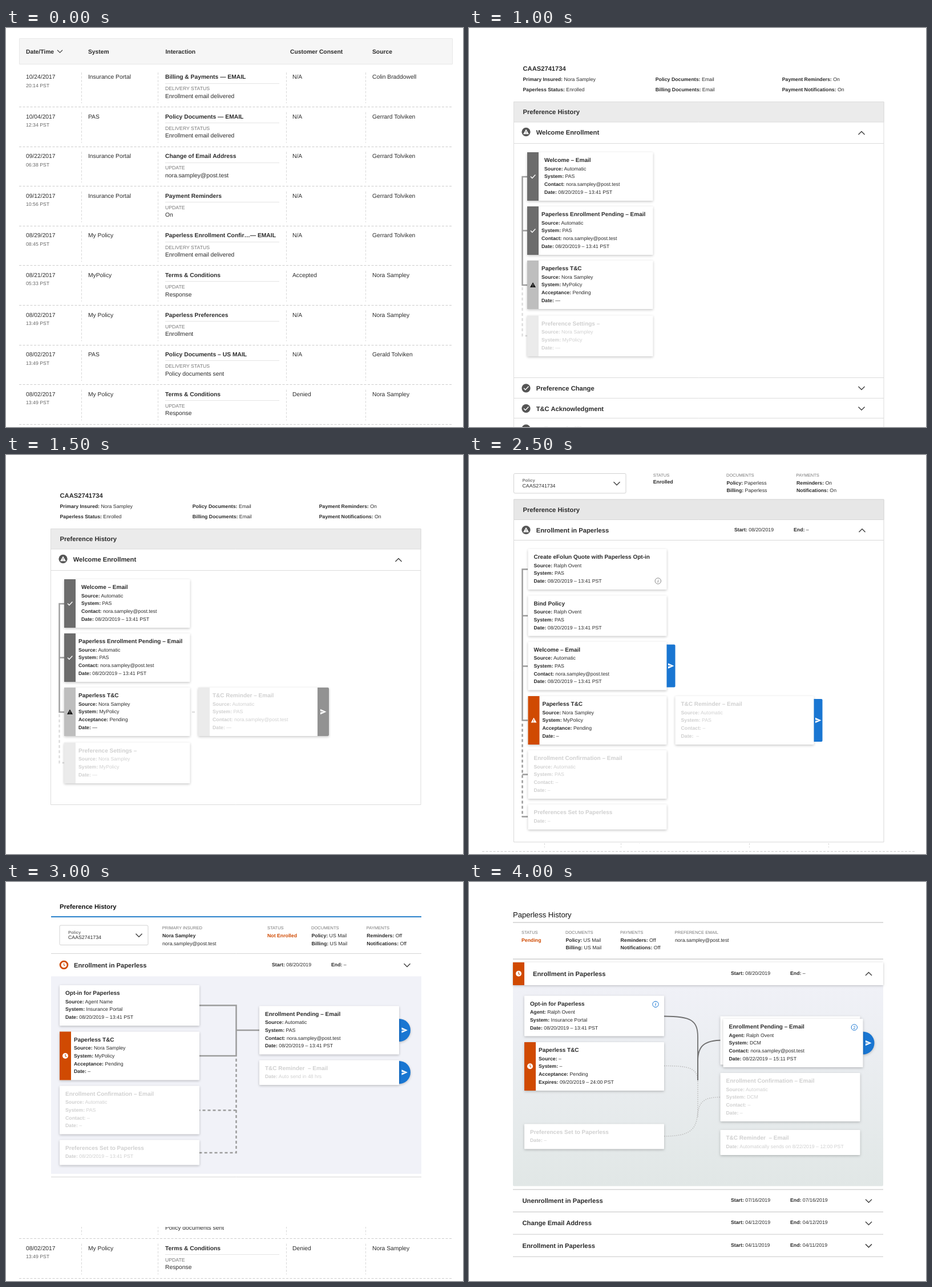
An HTML page with a canvas that plays this animation: 801 by 700 pixels, repeating every 4500 ms.

```html
<!DOCTYPE html>
<html lang="en">
<head>
<meta charset="utf-8">
<title>Preference history</title>
<style>
html, body { margin: 0; width: 100%; height: 100%; overflow: hidden; background: #fff; }
canvas { display: block; }
</style>
</head>
<body>
<canvas id="stage" width="801" height="700"></canvas>
<script>
const ctx = document.getElementById('stage').getContext('2d');
const HOLD = 500;
const INK = '#2b2b2b', FADE = '#d0d0d0', LABEL = '#777', DARK = '#555', WIRE = '#9c9c9c';
const ORANGE = '#d04a02', BLUE = '#1976d2';
const CLIENT = 'Nora Sampley', MAIL = 'nora.sampley@post.test', AGENT = 'Ralph Ovent';
const WHEN = 'Date: 08/20/2019 – 13:41 PST', POLICY = 'CAAS2741734';

// y is the middle of the capitals
function say(s, x, y, size = 8.75, weight = 400, col = INK) {
  ctx.font = `${weight} ${size}px "Liberation Sans", Helvetica, Arial, sans-serif`;
  ctx.fillStyle = col;
  ctx.fillText(s, x, y + size * 0.36 - 0.5);
  return x + ctx.measureText(s).width;
}
const bold = (s, x, y, size = 11.2, col = INK) => say(s, x, y, size, 700, col);
const label = (s, x, y) => say(s, x, y, 7.55, 400, LABEL);

// Bold key up to the colon, plain value after it
function pair(s, x, y, col = INK) {
  const cut = s.indexOf(':') + 1;
  say(s.slice(cut), bold(s.slice(0, cut), x, y, 8.75, col), y, 8.75, 400, col);
}

function lines(title, list, x, y, col = INK) {
  bold(title, x, y, 10, col);
  list.forEach((s, i) => pair(s, x, y + 15 + 13.75 * i, col));
}

function box(x, y, w, h, fill, edge, r = 0) {
  ctx.beginPath();
  ctx.roundRect(x, y, w, h, r);
  if (fill) { ctx.fillStyle = fill; ctx.fill(); }
  if (edge) { ctx.strokeStyle = edge; ctx.lineWidth = 1; ctx.stroke(); }
}

function stroke(d, col, width = 1, dash = []) {
  ctx.strokeStyle = col;
  ctx.lineWidth = width;
  ctx.setLineDash(dash);
  ctx.stroke(new Path2D(d));
  ctx.setLineDash([]);
}
const rule = (x1, x2, y, col, width = 1, dash) => stroke(`M${x1} ${y}H${x2}`, col, width, dash);

function disc(x, y, r, fill, edge) {
  ctx.beginPath();
  ctx.arc(x, y, r, 0, 7);
  if (fill) { ctx.fillStyle = fill; ctx.fill(); }
  if (edge) { ctx.strokeStyle = edge; ctx.lineWidth = 1; ctx.stroke(); }
}

function chevron(x, y, up, w = 5.5) {
  const h = (up ? -1 : 1) * w * 0.5;
  stroke(`M${x - w} ${y - h}L${x} ${y + h}L${x + w} ${y - h}`, '#444', w > 5 ? 1.5 : 1.1);
}

function tick(x, y) {
  stroke(`M${x - 4} ${y}l2.8 3l5.6 -6`, '#fff', 1.4);
}

function warn(x, y, col = '#fff', mark = DARK) {
  ctx.fillStyle = col;
  ctx.fill(new Path2D(`M${x} ${y - 4.8}l5 8.8h-10z`));
  stroke(`M${x} ${y - 1.5}v2.7m0 .9v1.1`, mark, 1);
}

function clock(x, y) {
  disc(x, y, 5, '#fff');
  stroke(`M${x} ${y - 3}v3.2l2 1.6`, ORANGE, 1.1);
}

function plane(x, y) {
  ctx.fillStyle = '#fff';
  ctx.fill(new Path2D(`M${x - 5} ${y - 4.7}l10.5 4.7l-10.5 4.7v-3.6l6.5 -1.1l-6.5 -1.1z`));
}

function badge(x, y, kind) {
  if (kind === 'open') return disc(x, y, 7.2, null, '#888');
  disc(x, y, 7.6, DARK);
  (kind === 'warn' ? warn : tick)(x, y);
}

function note(s, x, y, col) {
  disc(x, y, 5.2, '#fff', col);
  ctx.textAlign = 'center';
  say(s, x, y + 0.5, 7.5, s === 'i' ? 'italic 700' : 400, col);
  ctx.textAlign = 'left';
}

function lift(draw) {
  ctx.shadowColor = 'rgba(0,0,0,.23)';
  ctx.shadowBlur = 4;
  ctx.shadowOffsetY = 1.4;
  draw();
  ctx.shadowColor = 'transparent';
}

// pad: text inset; tab: colour of the left strip
function card(x, y, w, h, title, list, { pad = 10, tab, faded } = {}) {
  lift(() => box(x, y, w, h, '#fff', null, 1));
  if (tab) box(x, y, 20, h, tab);
  lines(title, list, x + pad, y + 14, faded ? FADE : INK);
}

function sendDot(x, y) {
  lift(() => {
    ctx.beginPath();
    ctx.arc(x, y, 20, -Math.PI / 2, Math.PI / 2);
    ctx.fillStyle = BLUE;
    ctx.fill();
  });
  plane(x + 9.5, y);
}

function sendTab(x, y, w, h, fill = '#929292') {
  box(x, y, w, h, fill, null, [0, 2, 2, 0]);
  plane(x + w / 2, y + h / 2);
}

function picker(x, y, w) {
  box(x, y, w, 34.5, '#fff', '#d2d2d2', 2);
  bold('Policy', x + 15, y + 12.3, 7.5, LABEL);
  say(POLICY, x + 15, y + 21.7);
  chevron(x + w - 16, y + 17.5, false);
}

function facts(x, y, head, list) {
  label(head, x, y);
  list.forEach((s, i) => pair(s, x + 0.5, y + 13.5 * (i + 1)));
}

function span(x, y, start, end) {
  pair('Start: ' + start, x, y);
  pair('End: ' + end, x + 104, y);
}

const mailed = ['DELIVERY STATUS', 'Enrollment email delivered'];
const LOG = [
  ['10/24/2017', '20:14', 'Insurance Portal', 'Billing & Payments — EMAIL', ...mailed, 'N/A', 'Colin Braddowell'],
  ['10/04/2017', '12:34', 'PAS', 'Policy Documents — EMAIL', ...mailed, 'N/A', 'Gerrard Tolviken'],
  ['09/22/2017', '06:38', 'Insurance Portal', 'Change of Email Address', 'UPDATE', MAIL, 'N/A', 'Gerrard Tolviken'],
  ['09/12/2017', '10:56', 'Insurance Portal', 'Payment Reminders', 'UPDATE', 'On', 'N/A', 'Gerrard Tolviken'],
  ['08/29/2017', '08:45', 'My Policy', 'Paperless Enrollment Confir…— EMAIL', ...mailed, 'N/A', 'Gerrard Tolviken'],
  ['08/21/2017', '05:33', 'MyPolicy', 'Terms & Conditions', 'UPDATE', 'Response', 'Accepted', CLIENT],
  ['08/02/2017', '13:49', 'My Policy', 'Paperless Preferences', 'UPDATE', 'Enrollment', 'N/A', CLIENT],
  ['08/02/2017', '13:49', 'PAS', 'Policy Documents – US MAIL', 'DELIVERY STATUS', 'Policy documents sent', 'N/A', 'Gerald Tolviken'],
  ['08/02/2017', '13:49', 'My Policy', 'Terms & Conditions', 'UPDATE', 'Response', 'Denied', CLIENT]
];

function log(top = 0) {
  ctx.save();
  ctx.beginPath();
  ctx.rect(0, top, 801, 700 - top);
  ctx.clip();
  box(23.5, 18.5, 759, 45, '#f6f6f6', '#e8e8e8');
  [['Date/Time', 35], ['System', 144], ['Interaction', 279.5], ['Customer Consent', 498], ['Source', 642]]
    .forEach(([s, x]) => bold(s, x, 41.3, 10.3));
  chevron(94.5, 41, false, 4.5);
  LOG.forEach(([date, time, system, title, kind, value, consent, source], i) => {
    const y = 86 + 69.57 * i;
    say(date, 35, y, 10.3);
    say(time + ' PST', 35, y + 15, 8.7, 400, '#666');
    say(system, 144, y, 10.3);
    bold(title, 279, y, 10.3);
    rule(279, 479, Math.round(y + 10.5) + 0.5, '#e4e4e4');
    say(kind, 279, y + 20.7, 8.7, 400, LABEL);
    say(value, 279, y + 33.5, 10.3);
    say(consent, 502, y, 10.3);
    say(source, 642, y, 10.3);
    for (const x of [132.5, 266.5, 491.5, 630.5]) stroke(`M${x} ${y - 8}V${y + 46}`, '#d8d8d8', 1, [4, 2.5]);
    rule(23, 783, Math.floor(y + 52.6) + 0.5, '#cdcdcd', 1, [4, 2.5]);
  });
  ctx.restore();
}

function summary(y) {
  bold(POLICY, 94.5, y);
  [['Primary Insured: ' + CLIENT, 'Paperless Status: Enrolled'],
   ['Policy Documents: Email', 'Billing Documents: Email'],
   ['Payment Reminders: On', 'Payment Notifications: On']]
    .forEach((col, i) => col.forEach((s, j) => pair(s, [94.5, 326.7, 548.7][i], y + 18.7 + 18.3 * j)));
}

function panel(top, bottom, edge, fill) {
  box(78.5, top, 648.5, bottom - top, '#fff', edge);
  box(78.5, top, 648.5, 35.5, fill, edge);
  bold('Preference History', 94.5, top + 18);
}

function welcome(edge) {
  badge(100, 182.3, 'warn');
  bold('Welcome Enrollment', 117.7, 183);
  chevron(688, 184.3, true);
  rule(78.5, 727, 202.5, edge);
}

function rows(top, edge) {
  ['Preference Change', 'T&C Acknowledgment', 'Policy and Billing Documents', 'Preference Change'].forEach((s, i) => {
    const y = top + 35.7 * i;
    rule(78.5, 727, Math.floor(y) + 0.5, edge);
    badge(100, y + 18.3, 'tick');
    bold(s, 117.7, y + 19.3);
    chevron(688, y + 18.3, false);
  });
}

function checklist() {
  const edge = '#858585';
  summary(72);
  panel(130.5, 580.5, edge, '#e7e7e7');
  welcome(edge);
  const list = ['Source: Agent', 'System: PAS', 'Contact: ' + MAIL, WHEN];
  stroke('M100 236V292M100 317V373M100 398V404', '#999', 1.4);
  badge(100, 223.5, 'tick');
  lines('Welcome – Email', list, 117.7, 224);
  badge(100, 304.5, 'tick');
  lines('Paperless Enrollment Pending – Email', list, 117.7, 305.4);
  badge(100, 385.7, 'warn');
  bold('Paperless Terms and Conditions Acceptance', 117.7, 386.8, 10);
  badge(100, 416.5, 'open');
  bold('Communication Preferences Set', 117.7, 417.5, 10, '#c8c8c8');
  rows(438, edge);
}

function tabCards(full) {
  const edge = '#dcdcdc', pale = '#ebebeb', grey = '#6c6c6c';
  summary(71.5);
  panel(129.5, full ? 613.5 : 760, edge, pale);
  welcome(edge);
  const auto = ['Source: Automatic', 'System: PAS', 'Contact: ' + MAIL];
  stroke('M102 261H93.5V451H102M93.5 355.5H102', '#a0a0a0', 2.5);
  stroke('M93.5 455V540H102', '#dedede', 2.5, [5, 4]);
  card(102, 218, 220.5, 85, 'Welcome – Email', [...auto, WHEN], { pad: 30, tab: grey });
  tick(112, 260.5);
  card(102, 313, 220.5, 85, 'Paperless Enrollment Pending – Email', [...auto, WHEN], { pad: 25, tab: grey });
  tick(112, 355.5);
  card(102, 408, 220.5, 85, 'Paperless T&C',
    ['Source: ' + CLIENT, 'System: MyPolicy', 'Acceptance: Pending', 'Date: —'], { pad: 25, tab: '#bebebe' });
  warn(112, 451, '#111', '#bebebe');
  card(102, 504.5, 220.5, 71.5, 'Preference Settings –',
    ['Source: ' + CLIENT, 'System: MyPolicy', 'Date: —'], { pad: 25, tab: pale, faded: true });
  if (!full) return rows(613.5, edge);
  rule(326, 331, 451, '#dedede', 2.5);
  card(337, 408, 229, 85, 'T&C Reminder – Email', [...auto, 'Date: —'], { pad: 25, tab: pale, faded: true });
  sendTab(546, 408, 20, 85);
}

function column(tab, send) {
  const edge = '#d8d8d8', pas = 'System: PAS', by = 'Source: ' + AGENT, auto = 'Source: Automatic';
  picker(78.5, 32, 196.5);
  label('STATUS', 322.7, 35);
  bold('Enrolled', 322.7, 47, 8.75);
  facts(451, 35, 'DOCUMENTS', ['Policy: Paperless', 'Billing: Paperless']);
  facts(573.5, 35, 'PAYMENTS', ['Reminders: On', 'Notifications: On']);
  panel(77.5, 678.5, edge, '#e7e7e7');
  badge(100, 131, 'warn');
  bold('Enrollment in Paperless', 117.7, 132);
  span(465, 130.5, '08/20/2019', '–');
  chevron(689, 132, true);
  rule(78.5, 727, 149, edge);
  stroke('M103 200H93.5V465H103M93.5 281.5H103M93.5 370H103', WIRE, 2.5);
  stroke('M93.5 471V634', WIRE, 2.5, [5, 4]);
  stroke('M93.5 560H103M92.5 634H103', WIRE, 2.5);
  card(103.5, 164.5, 243, 71, 'Create eFolun Quote with Paperless Opt-in', [by, pas, WHEN]);
  note('i', 331.3, 220.5, '#888');
  card(103.5, 246, 243, 71, 'Bind Policy', [by, pas, WHEN]);
  card(103.5, 327, 243, 85, 'Welcome – Email', [auto, pas, 'Contact: ' + MAIL, WHEN]);
  sendTab(346.5, 332, 15, 75, send);
  card(103.5, 422.5, 243, 85, 'Paperless T&C',
    ['Source: ' + CLIENT, 'System: MyPolicy', 'Acceptance: Pending', 'Date: –'], { pad: 25, tab });
  warn(113.5, 465, '#fff', tab);
  card(361.5, 422.5, 243, 85, 'T&C Reminder – Email', [auto, pas, 'Contact: –', 'Date:  –'], { faded: true });
  sendTab(604.5, 427.5, 15, 75, send);
  card(103.5, 517.5, 243, 85, 'Enrollment Confirmation – Email', [auto, pas, 'Contact: –', 'Date: –'], { faded: true });
  card(103.5, 612.5, 243, 44, 'Preferences Set to Paperless', ['Date: –'], { faded: true });
}

function branches() {
  const pas = 'System: PAS', auto = 'Source: Automatic';
  say('Preference History', 94, 43, 11.2, 700, '#111');
  rule(79, 728, 61, '#2a82cb', 2);
  picker(94, 76, 155);
  label('PRIMARY INSURED', 273.7, 81);
  bold(CLIENT, 274, 94.5, 8.75);
  say(MAIL, 274, 108);
  label('STATUS', 458, 81);
  bold('Not Enrolled', 458, 94.5, 8.75, ORANGE);
  facts(535, 81, 'DOCUMENTS', ['Policy: US Mail', 'Billing: US Mail']);
  facts(631.7, 81, 'PAYMENTS', ['Reminders: Off', 'Notifications: Off']);
  rule(79, 728, 125.5, '#d5d5d5');
  disc(101.5, 145.5, 7.8, ORANGE);
  clock(101.5, 145.5);
  bold('Enrollment in Paperless', 119, 146);
  span(466, 145, '08/20/2019', '–');
  chevron(703, 146, false);
  box(79, 165.5, 649, 346.5, '#f1f2f8');
  rule(79, 728, 517.5, '#d5d5d5');
  stroke('M339 216.5H403.5V305H339M403.5 260H444', WIRE, 2.5);
  stroke('M403.5 310V475H339M403.5 400.5H339', WIRE, 2.5, [5, 4]);
  card(94, 181, 245, 71, 'Opt-in for Paperless', ['Source: Agent Name', 'System: Insurance Portal', WHEN]);
  card(94, 262.5, 245, 85, 'Paperless T&C',
    ['Source: ' + CLIENT, 'System: MyPolicy', 'Acceptance: Pending', 'Date: –'], { pad: 25, tab: ORANGE });
  clock(104, 305);
  card(94, 357.5, 245, 85, 'Enrollment Confirmation – Email', [auto, pas, 'Contact: –', 'Date: –'], { faded: true });
  card(94, 452.5, 245, 44, 'Preferences Set to Paperless', [WHEN], { faded: true });
  sendDot(689, 260);
  sendDot(689, 334);
  card(444, 217.5, 245, 85, 'Enrollment Pending – Email', [auto, pas, 'Contact: ' + MAIL, WHEN]);
  card(444, 312.5, 245, 43.5, 'T&C Reminder  – Email', ['Date: Auto send in 48 hrs'], { faded: true });
}

function curves() {
  const line = '#d4d4d4';
  say('Paperless History', 77, 58, 13.1, 400, '#111');
  rule(77, 726, 71, '#cfcfcf', 1.6);
  label('STATUS', 92, 88.5);
  bold('Pending', 92, 102, 8.75, ORANGE);
  facts(169, 88.5, 'DOCUMENTS', ['Policy: US Mail', 'Billing: US Mail']);
  facts(265, 88.5, 'PAYMENTS', ['Reminders: Off', 'Notifications: Off']);
  label('PREFERENCE EMAIL', 360.5, 88.5);
  say(MAIL, 361, 102);
  rule(77, 726, 135.3, '#cfcfcf', 1.6);
  const haze = ctx.createLinearGradient(0, 181, 0, 533);
  haze.addColorStop(0, '#f0f1f7');
  haze.addColorStop(1, '#e1e7e6');
  box(77, 181, 649, 352.5, haze, null, [0, 0, 2, 2]);
  lift(() => box(77, 141, 649, 40, '#fff'));
  box(77, 141, 20, 40, ORANGE);
  clock(87, 160.7);
  bold('Enrollment in Paperless', 112, 161.3);
  span(459, 160.3, '08/20/2019', '–');
  chevron(700.5, 161.3, true);
  const dots = [1.5, 2];
  stroke('M342 322.5C385 322.5 401 326 401 350V395C401 432 392 446 342 446', '#bdbdbd', 1.6, dots);
  stroke('M440 377.5C412 377.5 401 386 401 412', '#bdbdbd', 1.6, dots);
  stroke('M342 235.5C388 235.5 401 242 401 272V348', '#707070', 1.8);
  stroke('M445 277.5C412 277.5 401 288 401 314V348', '#707070', 1.8);
  card(97, 199.5, 245, 71, 'Opt-in for Paperless', ['Agent: ' + AGENT, 'System: Insurance Portal', WHEN]);
  note('i', 327, 214.5, BLUE);
  card(97, 281, 245, 85, 'Paperless T&C',
    ['Source: –', 'System: –', 'Acceptance: Pending', 'Expires: 09/20/2019 – 24:00 PST'], { pad: 25, tab: ORANGE });
  clock(107, 323.3);
  card(97, 424.5, 245, 44, 'Preferences Set to Paperless', ['Date: –'], { faded: true });
  sendDot(690.5, 282.5);
  lift(() => box(440.5, 235.5, 245, 85, '#fff', null, 1));
  card(445.5, 240, 245, 85, 'Enrollment Pending – Email',
    ['Agent: ' + AGENT, 'System: DCM', 'Contact: ' + MAIL, 'Date: 08/22/2019 – 15:11 PST']);
  note('2', 675.3, 255, BLUE);
  card(440.5, 335, 245, 85, 'Enrollment Confirmation – Email',
    ['Source: Automatic', 'System: DCM', 'Contact: –', 'Date: –'], { faded: true });
  card(440.5, 435, 245, 44, 'T&C Reminder  – Email',
    ['Date: Automatically sends on 8/22/2019 – 12:00 PST'], { faded: true });
  rule(77, 726, 539.5, line, 1.4);
  [['Unenrollment in Paperless', '07/16/2019'], ['Change Email Address', '04/12/2019'],
   ['Enrollment in Paperless', '04/11/2019']].forEach(([s, day], i) => {
    const y = 559.5 + 39.3 * i;
    bold(s, 93.5, y);
    span(459, y - 1, day, day);
    chevron(700.5, y, false);
    rule(77, 726, y + 19.3, line, 1.4);
  });
}

function shifted(dy, draw) {
  ctx.save();
  ctx.translate(0, dy);
  draw();
  ctx.restore();
}

const scenes = [
  () => log(),
  checklist,
  () => tabCards(false),
  () => tabCards(true),
  () => column('#6c6c6c', '#929292'),
  () => { log(681); shifted(0.5, () => column(ORANGE, BLUE)); },
  () => { log(605); branches(); },
  () => shifted(2, branches),
  curves
];

let shown = -1;
function play() {
  const now = Math.floor(performance.now() / HOLD) % scenes.length;
  if (now !== shown) {
    shown = now;
    ctx.textRendering = 'geometricPrecision';
    box(0, 0, 801, 700, '#fff');
    scenes[now]();
  }
  requestAnimationFrame(play);
}
play();
</script>
</body>
</html>
```
